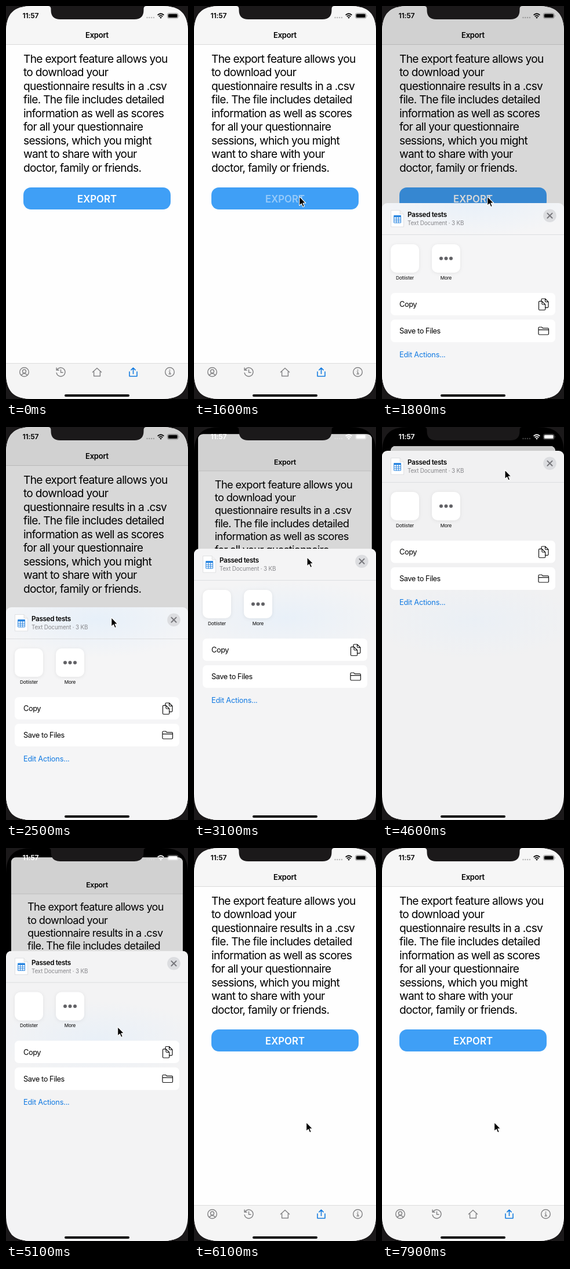
Write an HTML page that moves like this. It is 314x678 px and loops after 8000 ms.

```html
<!DOCTYPE html>
<html lang="en">
<head>
<meta charset="utf-8">
<title>Export</title>
<style>
  html, body { margin: 0; width: 100%; height: 100%; overflow: hidden; background: #1b191a; }
  svg { display: block; width: 100vw; height: 100vh; }
  text { font-family: Inter, Roboto, "Liberation Sans", sans-serif; }
  .semi { font-weight: 600; }
  .mid { text-anchor: middle; }
  .para { font-size: 19.2px; letter-spacing: -.72px; }
  .row { font-size: 12.8px; letter-spacing: -.43px; }
  .label { font-size: 8.2px; letter-spacing: -.15px; }
  .link { fill: #1079e2; letter-spacing: -.22px; }
  .line { fill: none; stroke-linecap: round; stroke-linejoin: round; }
  .tabs { stroke: #848486; stroke-width: 1.45; }
  .tile { fill: #fff; filter: drop-shadow(0 1px 3px rgba(0, 0, 0, .07)); }
</style>
</head>
<body>
<svg viewBox="0 0 314 678">
  <defs>
    <clipPath id="screen">
      <path d="M0 46C0 13 13 0 46 0H268C301 0 314 13 314 46V632C314 665 301 678 268 678H46C13 678 0 665 0 632Z"/>
    </clipPath>
    <clipPath id="cardClip"><rect id="cardShape" width="314" height="720"/></clipPath>
    <clipPath id="sheetClip"><rect width="314" height="760" rx="9"/></clipPath>
    <radialGradient id="tint">
      <stop offset="0" stop-color="#dfedfb" stop-opacity=".65"/>
      <stop offset="1" stop-color="#dfedfb" stop-opacity="0"/>
    </radialGradient>
  </defs>

  <g clip-path="url(#screen)">
    <rect width="314" height="678"/>

    <g id="card"><g clip-path="url(#cardClip)">
      <rect width="314" height="720" fill="#fefefe"/>
      <rect width="314" height="66" fill="#f6f6f6"/>
      <rect y="66" width="314" height="1" fill="#d9d9d9"/>
      <text class="semi mid" x="157" y="54.8" font-size="13" letter-spacing="-.22">Export</text>
      <g class="para" id="para"></g>
      <rect x="30" y="313" width="254" height="38" rx="13" fill="#3f9ff6"/>
      <text id="export" class="semi mid" x="157" y="338.5" font-size="16.8" fill="#fff">EXPORT</text>

      <rect y="616" width="314" height="104" fill="#f5f5f5"/>
      <rect y="616" width="314" height="1" fill="#dcdcdc"/>
      <g class="line tabs">
        <g transform="translate(31.5 631.5)">
          <circle r="7.8"/><circle cy="-1.2" r="3"/><path d="M-5 5.6Q-3.6 2.6 0 2.6T5 5.6"/>
        </g>
        <g transform="translate(94.5 631.5)">
          <path d="M-6.4-4A7.5 7.5 0 1 1-7.4 1.4M-7.4-7.2V-3.3H-3.4M0-4V.8H3.6"/>
        </g>
        <g transform="translate(157 631.5)">
          <path d="M-7.6.2L0-6.8 7.6.2M-5.4-1V7H5.4V-1"/>
        </g>
        <g transform="translate(219.5 631.5)" stroke="#147ce0" stroke-width="1.6">
          <path d="M-6.5-.5V7.2H6.5V-.5M0 3V-7M-3.6-3.6L0-7.2 3.6-3.6"/>
        </g>
        <g transform="translate(282.5 631.5)">
          <circle r="7.8"/><path d="M-1.2-.4H.2V3.2M-1.5 3.2H1.8"/><circle cy="-3.2" r=".4"/>
        </g>
      </g>
      <rect id="dim" width="314" height="720" opacity="0"/>
    </g></g>

    <g id="sheet"><g clip-path="url(#sheetClip)">
      <rect id="paper" width="314" height="760"/>
      <ellipse id="glow" cx="157" rx="190" ry="66" fill="url(#tint)"/>
      <rect y="54" width="314" height="1" fill="#dcdee0"/>

      <path d="M15.5 12.5H31L37.5 19V41H15.5Z" fill="#fff" stroke="#d9dadc" stroke-width=".8"/>
      <path d="M31 12.5V19H37.5" fill="#f1f1f1" stroke="#d9dadc" stroke-width=".8"/>
      <rect x="21" y="21.5" width="11.5" height="3" fill="#2b86e0"/>
      <path class="line" d="M21 21.5H32.5V34H21ZM21 27.7H32.5M21 30.8H32.5M24.8 21.5V34M28.7 21.5V34" stroke="#2b86e0"/>
      <text class="semi" x="44" y="24.3" font-size="11.7" letter-spacing="-.35">Passed tests</text>
      <text x="44" y="38" font-size="9.8" letter-spacing="-.15" fill="#87878b">Text Document · 3 KB</text>
      <circle cx="289.5" cy="21.7" r="11.3" fill="#dcdde0"/>
      <path class="line" d="M285.4 17.6L293.6 25.8M293.6 17.6L285.4 25.8" stroke="#77777c" stroke-width="2"/>

      <rect class="tile" x="15" y="71" width="49" height="49" rx="10"/>
      <rect class="tile" x="86" y="71" width="49" height="49" rx="10"/>
      <g fill="#626266">
        <circle cx="102" cy="95.5" r="3"/><circle cx="110.5" cy="95.5" r="3"/><circle cx="119" cy="95.5" r="3"/>
      </g>
      <text class="label mid" x="39.5" y="131.8">Dotlister</text>
      <text class="label mid" x="110.5" y="131.8">More</text>

      <rect x="15" y="155" width="284" height="38.5" rx="7" fill="#fff"/>
      <rect x="15" y="201" width="284" height="39" rx="7" fill="#fff"/>
      <g class="row">
        <text x="30" y="179">Copy</text>
        <text x="30" y="225">Save to Files</text>
        <text class="link" x="30" y="265.5">Edit Actions...</text>
      </g>
      <g class="line" stroke="#111" stroke-width="1.2">
        <path d="M275 169.3V166.5Q275 165 276.5 165H281.5L287 170.5V178.8Q287 180.3 285.5 180.3H281.7M281.5 165V169Q281.5 170.5 283 170.5H287"/>
        <path d="M272 169.3H276L281.7 175V183Q281.7 184.5 280.2 184.5H272Q270.5 184.5 270.5 183V170.8Q270.5 169.3 272 169.3ZM276 169.3V173.5Q276 175 277.5 175H281.7"/>
        <path d="M270 225.5V215.5Q270 214 271.5 214H275.6L277.4 215.8H286Q287.5 215.8 287.5 217.3V225.5Q287.5 227 286 227H271.5Q270 227 270 225.5ZM270 218.6H287.5"/>
      </g>
    </g></g>

    <g id="status">
      <text class="semi" x="28.5" y="21.4" font-size="12.2" letter-spacing="-.15">11:57</text>
      <g opacity=".26">
        <circle cx="243.5" cy="20" r="1.2"/><circle cx="247.3" cy="20" r="1.2"/><circle cx="251.1" cy="20" r="1.2"/><circle cx="254.9" cy="20" r="1.2"/>
      </g>
      <path d="M261.6 15.6Q267 10.8 272.4 15.6M263.7 18Q267 15.2 270.3 18" fill="none" stroke="currentColor" stroke-width="1.8"/>
      <path d="M265 19.6Q267 18.2 269 19.6L267 21.8Z"/>
      <rect x="278.5" y="12.5" width="18.5" height="8.8" rx="2.6" fill="none" stroke="currentColor" stroke-opacity=".45" stroke-width=".9"/>
      <rect x="279.8" y="13.8" width="15.9" height="6.2" rx="1.5"/>
      <path d="M298.2 15.4Q299.6 16.9 298.2 18.4Z" opacity=".5"/>
    </g>
    <path d="M72.5 0Q77.5 0 77.5 5V7Q77.5 23 93.5 23H221.5Q237.5 23 237.5 7V5Q237.5 0 242.5 0Z" fill="#1b191a"/>
    <rect x="101" y="670" width="112" height="4" rx="2"/>
  </g>

  <path id="cursor" d="M0 0V15.6L3.6 12.3 6 17.9 8.6 16.8 6.2 11.3H11Z" stroke="#fff" stroke-width="1.1" stroke-linejoin="round"/>
</svg>

<script>
  const $ = id => document.getElementById(id);
  const LOOP = 8000, STEP = 100, LOW = 311, HIGH = 41;

  const copy = [
    "The export feature allows you", "to download your", "questionnaire results in a .csv",
    "file. The file includes detailed", "information as well as scores", "for all your questionnaire",
    "sessions, which you might", "want to share with your", "doctor, family or friends."
  ];
  $("para").innerHTML = copy
    .map((s, i) => `<text x="30" y="${97.6 + 23.5 * i}">${s}</text>`).join("");

  // value at time t from keys [time, value, ...], eased between neighbours
  const smooth = k => k * k * (3 - 2 * k);
  function track(keys, t, ease = k => k, col = 1) {
    if (t <= keys[0][0]) return keys[0][col];
    for (let i = 1; i < keys.length; i++) {
      const a = keys[i - 1], b = keys[i];
      if (t <= b[0]) return a[col] + (b[col] - a[col]) * ease((t - a[0]) / (b[0] - a[0]));
    }
    return keys[keys.length - 1][col];
  }

  const sheetKeys = [
    [1600, 690], [1700, 470], [1800, 340], [1900, 315], [2000, LOW], [2800, LOW],
    [3000, 270], [3300, 90], [3400, 57], [3500, 45], [3600, HIGH],
    [4800, HIGH], [4900, 58], [5000, 112], [5100, 177.5], [5300, 292],
    [5500, 345], [5700, 410], [5800, 520], [5900, 625], [6000, 690]
  ];
  const dimKeys = [[1600, 0], [1700, .09], [1800, .15], [5700, .15], [6000, 0]];

  // the pointer glides at first, then drags the sheet down nearly evenly
  const glideKeys = [
    [100, 309, 490], [900, 192, 338], [1200, 181.8, 328.7], [2700, 181.8, 328.7],
    [3600, 213.5, 79], [4500, 212.5, 75], [4600, 212, 74]
  ];
  const dragKeys = [[4800, 212, 74], [4900, 206, 130], [5100, 192.7, 308.5], [5300, 193, 440], [5500, 193.7, 473]];

  function draw(t) {
    const y = track(sheetKeys, t);
    const p = Math.max(0, Math.min(1, (LOW - y) / (LOW - HIGH)));
    const scale = 1 - .095 * p ** .75, top = 33 * p;

    $("card").setAttribute("transform", `translate(${157 * (1 - scale)} ${top}) scale(${scale})`);
    $("cardShape").setAttribute("rx", Math.min(9, p * 30));
    $("dim").setAttribute("opacity", track(dimKeys, t) + .05 * Math.max(0, p - .5));
    $("export").setAttribute("opacity", t >= 1400 && t < 1800 ? .45 : 1);

    const tone = Math.round(245 - 4 * p);
    $("sheet").setAttribute("transform", `translate(0 ${y})`);
    $("paper").setAttribute("fill", `rgb(${tone},${tone},${tone + 1})`);
    $("glow").setAttribute("cy", top + scale * 332 - y);
    $("glow").setAttribute("opacity", 1 - .45 * p);

    const ink = p > .3 ? "#fff" : "#000";
    $("status").setAttribute("fill", ink);
    $("status").setAttribute("color", ink);

    const [keys, ease] = t < 4800 ? [glideKeys, smooth] : [dragKeys];
    $("cursor").setAttribute("transform", `translate(${track(keys, t, ease)} ${track(keys, t, ease, 2)})`);
    $("cursor").setAttribute("visibility", t >= 100 ? "visible" : "hidden");
  }

  const start = performance.now();
  function tick() {
    const t = (performance.now() - start) % LOOP;
    draw(Math.floor(t / STEP) * STEP);
    requestAnimationFrame(tick);
  }
  tick();
</script>
</body>
</html>
```
